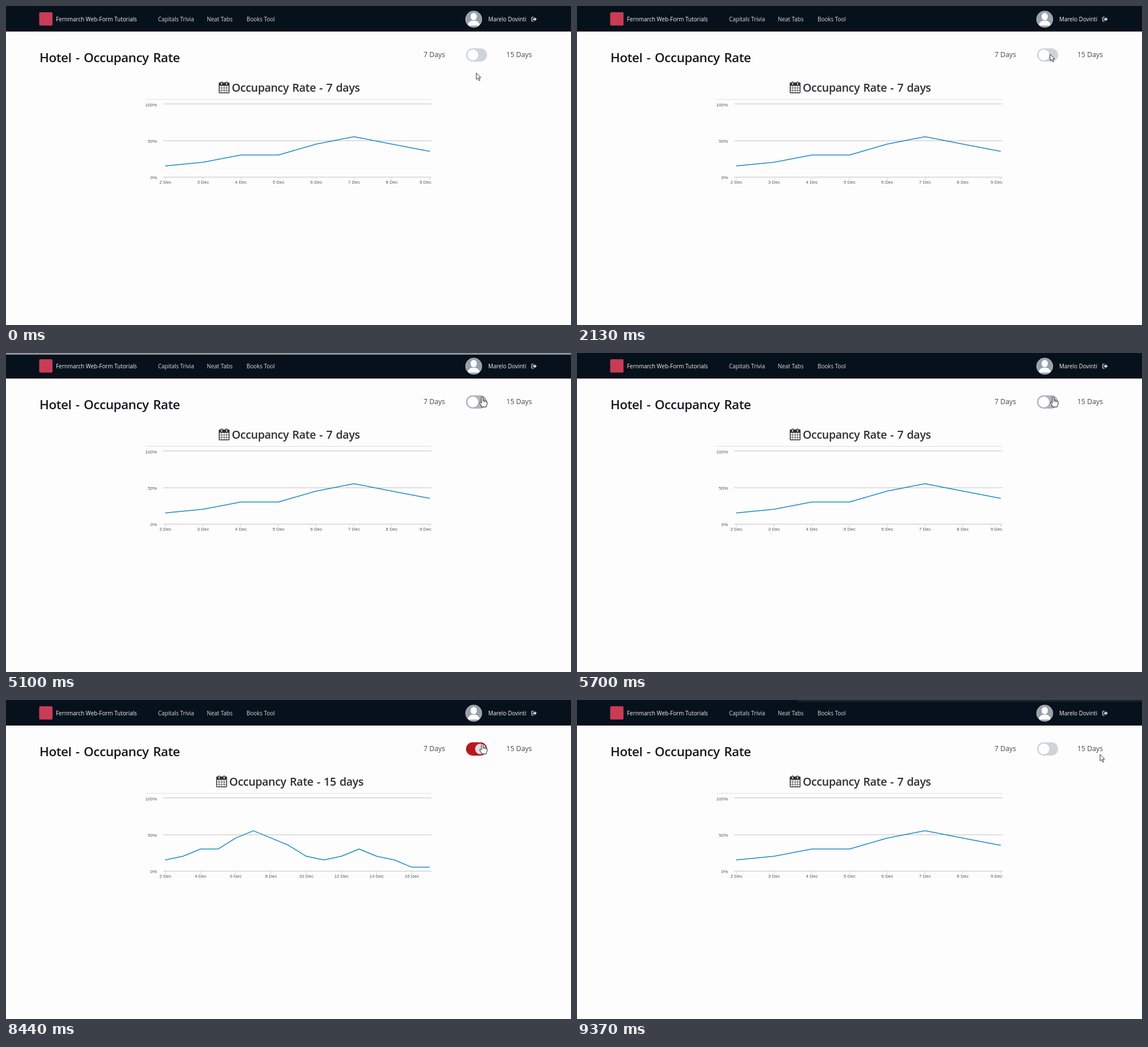
An HTML page for the animation above (9400 ms loop, 996 px wide and 562 px high).

```html
<!DOCTYPE html>
<html lang="en">
<head>
<meta charset="utf-8">
<title>Hotel - Occupancy Rate</title>
<style>
  html, body { margin: 0; width: 100%; height: 100%; overflow: hidden; background: #fdfdfd; }
  svg { display: block; width: 996px; height: 562px; font-family: "Open Sans", "Noto Sans", sans-serif; }
  .nav { font-size: 9.9px; fill: #d9dcdf; }
  .nav .strong { fill: #f4f5f6; }
  .title { font-size: 22.4px; font-weight: 600; letter-spacing: -.4px; word-spacing: 2px; fill: #17171b; }
  .heading { font-size: 19.7px; font-weight: 600; letter-spacing: -.4px; word-spacing: 1.5px; fill: #2e2f33; }
  .days { font-size: 12.3px; fill: #45474b; }
  .axis { font: 8px "Liberation Sans", Arial, sans-serif; fill: #555; }
  .rule { stroke: #c4c4c4; }
</style>
</head>
<body>
<svg viewBox="0 0 996 562">
  <rect width="996" height="562" fill="#fdfdfd"/>
  <rect width="996" height="45" fill="#07111b"/>
  <rect id="bar" height="3" fill="#8d9299"/>

  <rect x="58.5" y="11" width="23.5" height="23.5" rx="2" fill="#c83c56"/>
  <g class="nav">
    <text class="strong" x="88" y="27">Fernmarch Web-Form Tutorials</text>
    <text x="268" y="27">Capitals Trivia</text>
    <text x="354" y="27">Neat Tabs</text>
    <text x="424" y="27">Books Tool</text>
    <text class="strong" x="850" y="27">Marelo Dovinti</text>
  </g>

  <clipPath id="round"><circle cx="824.5" cy="23.3" r="14"/></clipPath>
  <circle cx="824.5" cy="23.3" r="14.7" fill="#c3c8cc"/>
  <g clip-path="url(#round)">
    <rect x="809" y="8" width="31" height="31" fill="#98a1a9"/>
    <ellipse cx="824.5" cy="18.6" rx="5.6" ry="6.4" fill="#fff"/>
    <path d="M814 34.500q0-6 6.500-8.500h8q6.500 2.500 6.500 8.500z" fill="#fff"/>
  </g>
  <path d="M930 19.700h-2q-1.500 0-1.500 1.500v4.200q0 1.500 1.500 1.500h2" fill="none" stroke="#d3d6d9" stroke-width="1.200"/>
  <path d="M928.500 22h3v-2.500l4.200 3.800-4.200 3.800v-2.500h-3z" fill="#d3d6d9"/>

  <text class="title" x="59" y="98.500">Hotel - Occupancy Rate</text>
  <text class="days" x="736" y="89.500">7 Days</text>
  <text class="days" x="882" y="89.500">15 Days</text>
  <rect id="track" x="811" y="74.500" width="37" height="23.500" rx="11.750"/>
  <circle id="knob" cy="86.300" r="9.500"/>

  <g id="head">
    <g id="calendar" transform="translate(375 133.300) scale(.01142)"></g>
    <text id="heading" class="heading" x="398" y="151"></text>
  </g>

  <path d="M246 164.500H750" stroke="#dedede"/>
  <path class="rule" d="M277 172.500H750M277 237.500H750M277 301.500H750"/>
  <g class="axis" text-anchor="end">
    <text x="266" y="176.500">100%</text>
    <text x="266" y="240.500">50%</text>
    <text x="266" y="304.500">0%</text>
  </g>
  <g id="axis" class="axis"></g>
  <path id="line" fill="none" stroke="#1a8bc4" stroke-width="1.500" stroke-linejoin="round" stroke-linecap="round"/>

  <g stroke="#1c1c24" fill="#fff" stroke-linejoin="round">
    <path id="arrow" d="M0 0V11.300L2.600 8.900 4.700 13.500 6.600 12.600 4.600 8.200H8Z" stroke-width=".9"/>
    <g id="hand">
      <path d="M-1.500 1.500q0-1.500 1.500-1.500t1.500 1.500V6.500q2-.8 2.600 .6q2-.7 2.600 .8q2-.3 2 1.600V12q0 2.500-1.500 4V18H-1.500V16.300L-4.500 11.500q-.8-1.600 .5-1.900q1-.2 2.500 1.800Z"/>
      <path d="M1.500 6.500V9.500M4.100 7.100V9.800M6.700 8V10" stroke-width=".8"/>
    </g>
  </g>
</svg>
<script>
const LOOP = 9400;
const CLICKS = [2990, 4680, 6500, 8475];
const HOVER = [2200, 9050];
const LEFT = 281, RIGHT = 746.5;
const RATES = [15, 20, 30, 30, 45, 55, 45, 35, 20, 15, 20, 30, 20, 15, 5, 5];
// time, x, y of the pointer tip
const PATH = [
  [0, 829, 118], [1000, 829, 118], [1930, 831, 108], [2130, 834, 85],
  [2500, 839.5, 77], [8900, 839.5, 77], [9350, 922, 96], [LOOP, 922, 96]
];

const $ = id => document.getElementById(id);
const clamp = v => Math.min(1, Math.max(0, v));
const lerp = (a, b, k) => a + (b - a) * k;
const sine = k => (1 - Math.cos(Math.PI * k)) / 2;
const mix = (a, b, k) => `rgb(${a.map((v, i) => Math.round(lerp(v, b[i], k)))})`;

function add(parent, tag, attrs, text) {
  const el = document.createElementNS(parent.namespaceURI, tag);
  for (const name in attrs) el.setAttribute(name, attrs[name]);
  if (text) el.textContent = text;
  return parent.appendChild(el);
}

function set(id, attrs) {
  for (const name in attrs) $(id).setAttribute(name, attrs[name]);
}

function drawCalendar() {
  const box = (x, y, w, h, rx, fill) =>
    add($('calendar'), 'rect', { x, y, width: w, height: h, rx, fill });
  const dark = '#33323a', light = '#fdfdfd';
  box(0, 128, 1664, 1664, 128, dark);
  for (const x of [256, 1024]) {
    box(x, 0, 384, 580, 160, dark);
    box(x + 128, 128, 128, 352, 32, light);
  }
  for (const [x, w] of [[128, 288], [480, 320], [864, 320], [1248, 288]])
    for (const [y, h] of [[640, 288], [992, 320], [1376, 288]])
      box(x, y, w, h, 0, light);
}

function makeTicks(last, step, wide) {
  const ticks = [];
  for (let day = 0; day <= last; day += step) {
    const g = add($('axis'), 'g', {});
    add(g, 'path', { d: 'M.5 301V306', stroke: '#d0d0d0' });
    const edge = !wide && day === last;
    add(g, 'text', { x: edge ? 4 : 0.5, y: 312.5, 'text-anchor': edge ? 'end' : 'middle' }, `${day + 2} Dec`);
    ticks.push({ g, day, wide });
  }
  return ticks;
}

// 0 = 7 days, 1 = 15 days
function modeAt(t, delay, span) {
  let k = 0;
  CLICKS.forEach((click, i) => {
    const p = sine(clamp((t - click - delay) / span));
    if (t >= click + delay) k = i % 2 ? 1 - p : p;
  });
  return k;
}

function drawChart(k) {
  const gap = lerp((RIGHT - LEFT) / 7, (RIGHT - LEFT) / 15, k);
  for (const { g, day, wide } of ticks) {
    const x = LEFT + day * gap;
    g.setAttribute('transform', `translate(${Math.round(x * 10) / 10 - .5})`);
    g.setAttribute('opacity', x > 751 ? 0 : wide ? k : 1 - k);
  }
  const points = RATES.map((rate, i) => {
    const j = Math.min(i, 7);
    const x = lerp(LEFT + j * (RIGHT - LEFT) / 7, LEFT + i * (RIGHT - LEFT) / 15, k);
    const y = 301 - 1.285 * lerp(RATES[j], rate, k);
    return `${x.toFixed(2)} ${y.toFixed(2)}`;
  });
  set('line', { d: 'M' + points.join('L') });
}

function drawToggle(t) {
  const k = modeAt(t, 0, 150);
  const hover = clamp((t - HOVER[0]) / 150) - clamp((t - HOVER[1]) / 150);
  const off = [206, 212, 218].map((v, i) => lerp(v, [173, 181, 189][i], hover));
  set('track', { fill: mix(off, [184, 24, 28], k) });
  set('knob', { cx: lerp(823, 836.5, k), fill: mix([255, 255, 255], [221, 223, 225], k) });
}

function drawHeading(t) {
  const wide = CLICKS.filter(click => t >= click + 40).length % 2;
  const label = `Occupancy Rate - ${wide ? 15 : 7} days`;
  if ($('heading').textContent !== label) $('heading').textContent = label;
  set('head', { transform: `translate(${wide ? -4.4 : 0})` });
}

function drawBar(t) {
  const start = t >= CLICKS[3] ? CLICKS[3] : CLICKS[1];
  const age = t - start;
  const grow = sine(clamp(age / 250));
  const leave = clamp((age - 812) / 215);
  set('bar', {
    x: 996 * leave,
    width: age < 0 ? 0 : 996 * Math.max(0, grow - leave),
    opacity: (1 - leave) ** 4
  });
}

function drawPointer(t) {
  const i = Math.max(1, PATH.findIndex(p => p[0] > t));
  const [a, b] = [PATH[i - 1], PATH[i]];
  const k = sine((t - a[0]) / (b[0] - a[0]));
  const place = `translate(${lerp(a[1], b[1], k)} ${lerp(a[2], b[2], k)})`;
  const hand = t >= HOVER[0] && t < HOVER[1];
  set('hand', { transform: place, visibility: hand ? 'visible' : 'hidden' });
  set('arrow', { transform: place, visibility: hand ? 'hidden' : 'visible' });
}

function render(t) {
  drawChart(modeAt(t, 40, 280));
  drawToggle(t);
  drawHeading(t);
  drawBar(t);
  drawPointer(t);
}

drawCalendar();
const ticks = [...makeTicks(7, 1, false), ...makeTicks(14, 2, true)];
const begin = performance.now();
function frame() {
  render((performance.now() - begin) % LOOP);
  requestAnimationFrame(frame);
}
frame();
</script>
</body>
</html>
```
